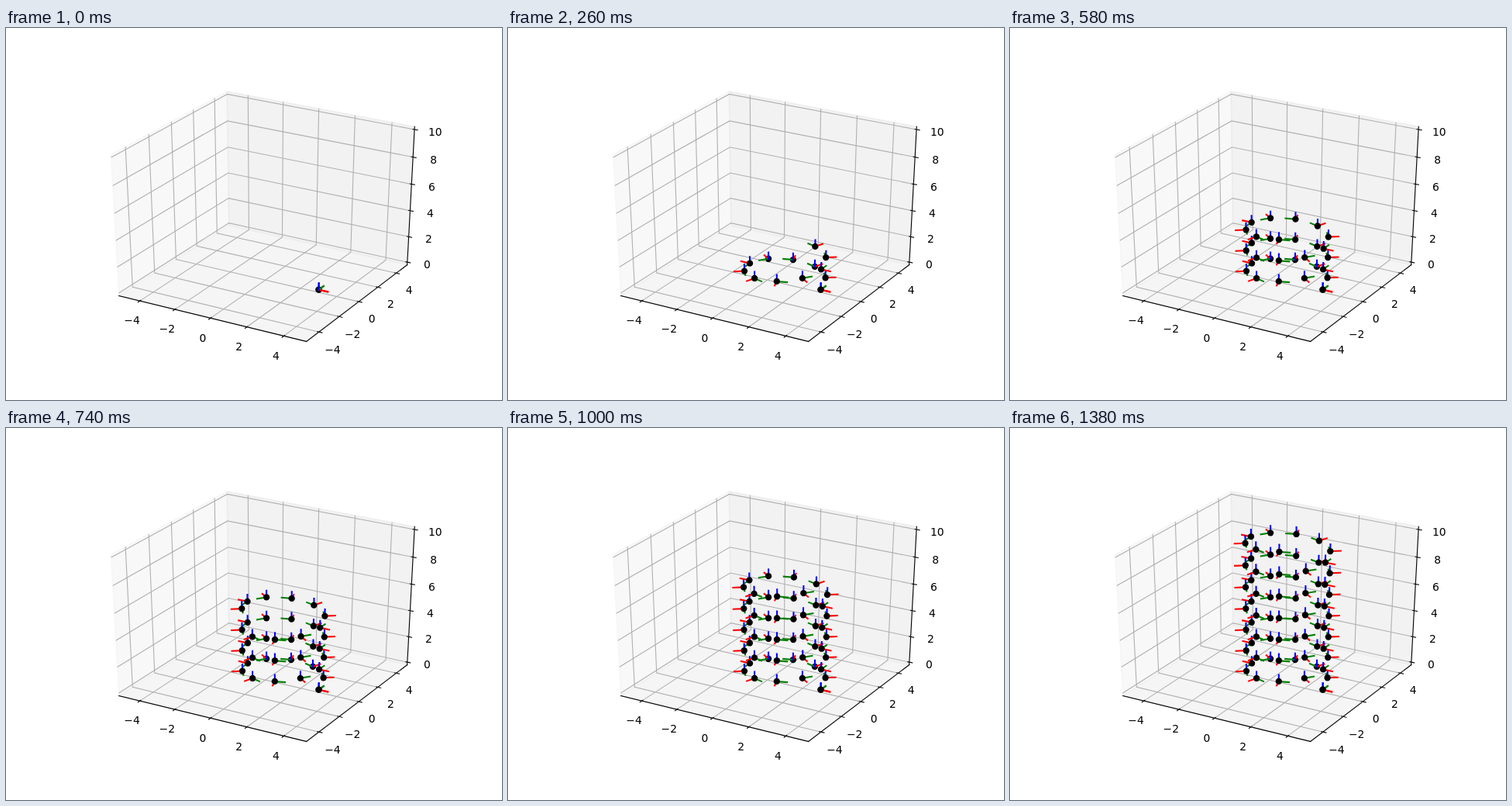
An HTML page that plays this animation: 640x480 px, repeating every 1400 ms.

```html
<!DOCTYPE html>
<html lang="en">
<head>
<meta charset="utf-8">
<title>Helix of rotating frames</title>
<style>
  html, body { margin: 0; width: 100%; height: 100%; overflow: hidden; background: #fff; }
  svg { display: block; width: 640px; height: 480px; }
  text { font: 13.889px "DejaVu Sans", sans-serif; text-anchor: middle; }
  .grid { fill: none; stroke: #b0b0b0; stroke-width: 1.11; }
  .axis { fill: none; stroke: #000; stroke-width: 1.11; stroke-linecap: square; }
  .pane { stroke-width: 1.39; opacity: 1; }
  #rods { fill: none; stroke-width: 2.083; stroke-linecap: square; }
</style>
</head>
<body>
<svg viewBox="0 0 640 480" xmlns="http://www.w3.org/2000/svg">
  <g id="box"></g>
  <g id="back"></g>
  <g id="rods"></g>
  <g id="front"></g>
</svg>
<script>
const STEP = 20, COUNT = 70;
const RAD = Math.PI / 180, ELEV = 30 * RAD, AZIM = -60 * RAD, DIST = 10;
const $ = id => document.getElementById(id);
const dot = (a, b) => a[0] * b[0] + a[1] * b[1] + a[2] * b[2];

// Camera basis for a unit cube centred on the view point
const right = [-Math.sin(AZIM), Math.cos(AZIM), 0];
const up = [-Math.sin(ELEV) * Math.cos(AZIM), -Math.sin(ELEV) * Math.sin(AZIM), Math.cos(ELEV)];
const toEye = [Math.cos(ELEV) * Math.cos(AZIM), Math.cos(ELEV) * Math.sin(AZIM), Math.sin(ELEV)];

const unit = p => [p[0] / 10, p[1] / 10, p[2] / 10 - 0.5];
const depth = p => DIST - dot(toEye, unit(p));

function project(p) {
  const u = unit(p), d = depth(p);
  return [
    80 + 496 * (dot(right, u) / d + 0.095) / 0.185,
    427.2 - 369.6 * (dot(up, u) / d + 0.095) / 0.185
  ];
}

const path = (...pts) => "M" + pts.map(p => project(p).map(v => v.toFixed(2)).join(" ")).join("L");
const stroke = (cls, ...pts) => `<path class="${cls}" d="${path(...pts)}"/>`;

// Axes box
const DELTA = 10 / 12, PAD = DELTA / 4;
const lo = [-5 - PAD, -5 - PAD, -PAD], hi = [5 + PAD, 5 + PAD, 10 + PAD];
const LABEL = 11.5 * 48 / 623.232 * DELTA;

function pane(grey, ...pts) {
  const c = `rgb(${grey},${grey},${grey})`;
  return `<path class="pane" d="${path(...pts)}Z" fill="${c}" stroke="${c}" fill-opacity=".5" stroke-opacity=".5"/>`;
}

function label(value, p) {
  const [x, y] = project(p);
  const s = String(value).replace("-", "\u2212");
  return `<text x="${x.toFixed(2)}" y="${Math.round(y + 10.7)}">${s}</text>`;
}

// Axis k runs along `edge`; ticks point along `dir`, labels move by `shift`
function axis(k, edge, dir, shift, ticks, gridLine) {
  const at = (v, base = edge) => base.map((c, j) => j === k ? v : c);
  let out = stroke("axis", at(lo[k]), at(hi[k]));
  for (const v of ticks) out += stroke("grid", ...gridLine(v));
  for (const v of ticks) {
    const p = at(v), sign = edge[dir] === hi[dir] ? 1 : -1;
    const move = d => p.map((c, j) => j === dir ? c + sign * d : c);
    out += stroke("axis", move(0.2 * DELTA), move(-0.1 * DELTA));
    out += label(v, p.map((c, j) => c + shift[j] * LABEL));
  }
  return out;
}

function drawBox() {
  const [x0, y0, z0] = lo, [x1, y1, z1] = hi;
  const side = [-4, -2, 0, 2, 4], tall = [0, 2, 4, 6, 8, 10];
  $("box").innerHTML =
    pane(242, [x0, y0, z0], [x0, y1, z0], [x0, y1, z1], [x0, y0, z1]) +
    pane(230, [x0, y1, z0], [x1, y1, z0], [x1, y1, z1], [x0, y1, z1]) +
    pane(236, [x0, y0, z0], [x1, y0, z0], [x1, y1, z0], [x0, y1, z0]) +
    axis(0, [0, y0, z0], 1, [0, -1, -1], side, v => [[v, y0, z0], [v, y1, z0], [v, y1, z1]]) +
    axis(1, [x1, 0, z0], 0, [1, 0, -1], side, v => [[x1, v, z0], [x0, v, z0], [x0, v, z1]]) +
    axis(2, [x1, y1, 0], 0, [1, 1, 0], tall, v => [[x1, y1, v], [x0, y1, v], [x0, y0, v]]);
}

// Helix of radius 2 around (1, 0), ten frames per turn
function pose(i) {
  const a = i * Math.PI / 5, c = Math.cos(a), s = Math.sin(a);
  return { p: [1 + 2 * c, 2 * s, a / 4], axes: [[c, s, 0], [-s, c, 0], [0, 0, 1]] };
}

const COLORS = ["#f00", "#008000", "#00f"];

function rods({ p, axes }) {
  return axes.map((v, k) => {
    const tip = p.map((c, j) => c + v[j] / 2);
    return `<path stroke="${COLORS[k]}" d="${path(p, tip)}"/>`;
  }).join("");
}

function ball({ p }) {
  const [x, y] = project(p);
  return `<circle cx="${x.toFixed(2)}" cy="${y.toFixed(2)}" r="4.15"/>`;
}

function draw(n) {
  // The first pose is laid down twice
  const poses = [pose(0)];
  for (let i = 0; i < Math.max(1, n); i++) poses.push(pose(i));
  const sorted = [...poses].sort((a, b) => depth(b.p) - depth(a.p));
  $("back").innerHTML = sorted.slice(0, 3).map(ball).join("");
  $("rods").innerHTML = poses.map(rods).join("");
  $("front").innerHTML = sorted.slice(3).map(ball).join("");
}

let shown = -1;
const start = performance.now();

function tick(now) {
  const n = Math.floor(Math.max(0, now - start) / STEP) % COUNT;
  if (n !== shown) draw(shown = n);
  requestAnimationFrame(tick);
}

drawBox();
draw(0);
requestAnimationFrame(tick);
</script>
</body>
</html>
```
